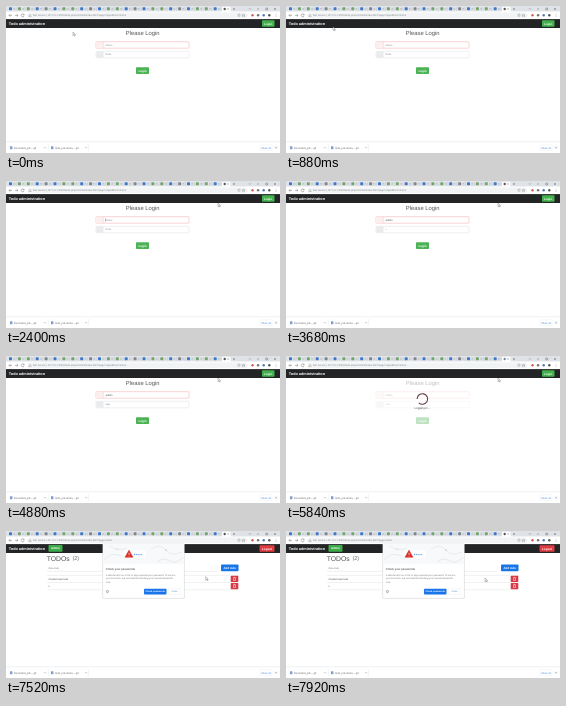
An HTML page that plays this animation: 274x147 px, repeating every 8000 ms.

```html
<!DOCTYPE html>
<html lang="en">
<head>
<meta charset="utf-8">
<title>Todo login</title>
<style>
html, body { margin: 0; width: 100%; height: 100%; overflow: hidden; background: #fff; }
svg { display: block; width: 100vw; height: 100vh; }
text { font-family: "Liberation Sans", Arial, sans-serif; text-rendering: geometricPrecision; }
</style>
</head>
<body>
<svg id="stage" viewBox="0 0 274 147"></svg>
<script>
const LOOP = 8000;
const stage = document.getElementById("stage");

function el(name, attrs, parent = stage) {
  const node = document.createElementNS("http://www.w3.org/2000/svg", name);
  for (const key in attrs) node.setAttribute(key, attrs[key]);
  parent.appendChild(node);
  return node;
}
const group = (parent = stage) => el("g", {}, parent);
const rect = (p, x, y, width, height, fill, more = {}) =>
  el("rect", { x, y, width, height, fill, ...more }, p);
const path = (p, d, stroke, width = 0.5, fill = "none") =>
  el("path", { d, stroke, "stroke-width": width, fill }, p);
const dot = (p, cx, cy, r, fill) => el("circle", { cx, cy, r, fill }, p);
function label(p, x, y, size, fill, words, more = {}) {
  const node = el("text", { x, y, "font-size": size, fill, ...more }, p);
  node.textContent = words;
  return node;
}
const mid = { "text-anchor": "middle" };
function button(p, x, y, w, h, fill, words, size = 3) {
  rect(p, x, y, w, h, fill, { rx: 0.8 });
  label(p, x + w / 2, y + h / 2 + size * 0.35, size, "#fff", words, { ...mid, "font-weight": 700 });
}

const clamp = v => Math.max(0, Math.min(1, v));
const ramp = (t, a, b) => clamp((t - a) / (b - a));
const show = (node, on) => node.setAttribute("visibility", on ? "visible" : "hidden");

rect(stage, 0, 0, 274, 147, "#fff");

// login page
const login = group();
label(login, 136.7, 28.7, 5.85, "#555", "Please Login", mid);
function field(y, stroke) {
  rect(login, 90, y, 93, 6.5, "#fff", { rx: 0.7, stroke, "stroke-width": 0.5 });
  rect(login, 90.2, y + 0.2, 7, 6.1, stroke === "#f3a6a6" ? "#fbefef" : "#e9ebed");
  path(login, `M97.2 ${y}v6.5`, stroke, 0.3);
  return label(login, 99.5, y + 4.1, 2.6, "#888", "");
}
const user = field(35.7, "#f3a6a6");
const pass = field(45.3, "#dcdfe2");
const caret = rect(login, 99, 37.2, 0.3, 3.2, "#333");
button(login, 130, 61.2, 13, 6.8, "#4cb355", "Login");

// todo page
const todos = group();
const heading = label(todos, 40.8, 29.5, 6.8, "#555", "TODOs");
const count = label(todos, 66.5, 29.4, 5.4, "#666", "(2)");
label(todos, 42.5, 37.8, 2.5, "#777", "New todo");
path(todos, "M41 40.4H211", "#dcdfe2", 0.4);
button(todos, 215, 33.5, 17.5, 6.8, "#1976e8", "Add todo", 2.9);
const list = group(todos);
path(list, "M41 44.4H233M41 51.6H233M41 58.8H233", "#d9dcdf", 0.4);
["Created new todo", "x"].forEach((name, i) => {
  const y = 44.8 + i * 7.1;
  label(list, 42.5, y + 4.2, 2.5, "#444", name);
  rect(list, 224.7, y, 7.6, 6.3, "#d93a45", { rx: 0.8 });
  path(list, `M227 ${y + 2}h3M227.5 ${y + 2.4}v2.2h2v-2.2M228 ${y + 1.5}h1`, "#fff", 0.5);
});

// busy layer
const veil = rect(stage, 0, 22, 274, 113, "#fff");
const busy = group();
const ring = path(busy, "", "#653d48", 1.1);
const note = label(busy, 136.4, 0, 2.9, "#444", "", mid);

// browser frame
const chrome = group();
rect(chrome, 0, 0, 274, 5.7, "#dfe2e7");
const tints = ["#3b78c9", "#555", "#333", "#d34a45", "#7d858d", "#4f9bd5", "#222", "#d9665e", "#71a56b", "#4a5d78"];
for (let i = 0; i < 24; i++) {
  const x = 3 + i * 8.9;
  rect(chrome, x, 1.3, 3, 3, tints[(i * 7 + i * i) % tints.length], { rx: 0.8 });
  path(chrome, `M${x + 4.7} 2.3l1.1 1.2m0 -1.2l-1.1 1.2`, "#777", 0.35);
  path(chrome, `M${x + 7.3} 1.2v3.2`, "#aeb3b9", 0.3);
}
path(chrome, "M215 5.8q1 0 1-1.2V1.8q0-1 1-1h6.5q1 0 1 1v2.8q0 1.2 1 1.2z", "none", 0, "#fff");
const icon = dot(chrome, 218.7, 3, 1.2, "#555");
path(chrome, "M221.5 2.4l1.2 1.2m0-1.2l-1.2 1.2M227 3h2M228 2v2", "#555", 0.4);
path(chrome, "M243 2.4l1 1l1-1M251 3h2M259.8 2.1h1.8v1.8h-1.8zM268 2l2 2m0-2l-2 2", "#555", 0.4);
rect(chrome, 0, 5.7, 274, 7.4, "#fff");
rect(chrome, 21.5, 6.5, 220, 5.6, "#f1f3f4", { rx: 2.8 });
path(chrome, "M6 9.4H3m1.3-1.3L3 9.4l1.3 1.3M9 9.4h3m-1.3-1.3l1.3 1.3l-1.3 1.3", "#666", 0.45);
path(chrome, "M18 8.6a1.5 1.5 0 1 0 .1 1.3M18.2 7.9v1h-1", "#666", 0.45);
path(chrome, "M24 8.3l1.3 2.1h-2.6z", "#777", 0.35);
const url = label(chrome, 27, 10.3, 2.55, "#80868b", "");
path(chrome, "M232 8.2h2v2h-2zM237.5 8l.5 1h1l-.8.7l.3 1l-1-.6l-1 .6l.3-1l-.8-.7h1z", "#777", 0.35);
["#d65c52", "#777", "#4c79bd", "#555"].forEach((c, i) => dot(chrome, 246.5 + i * 5.6, 9.3, 1.2, c));
[8, 9.3, 10.6].forEach(y => dot(chrome, 270, y, 0.3, "#555"));

rect(chrome, 0, 13.1, 274, 8.9, "#222426");
label(chrome, 2.8, 18.7, 3.8, "#fff", "Todo administration", { "font-weight": 700 });
const guest = group();
button(guest, 256, 14.2, 12.5, 6.6, "#43b24d", "Login", 2.9);
const member = group();
button(member, 42.5, 14, 14, 6.8, "#3daa49", "Admin", 2.9);
button(member, 253.5, 14.2, 15, 6.6, "#e03d43", "Logout", 2.9);

// download bar
const bar = group();
path(bar, "M0 135.8H274M42.2 138v7M82.3 138v7", "#d9dce0", 0.4);
["Recorded_job-...gif", "todo_job-demo-...gif"].forEach((name, i) => {
  const x = 4 + i * 41;
  rect(bar, x, 140.3, 2.4, 3, "#7e9fd0", { rx: 0.3 });
  label(bar, x + 4, 142.8, 2.65, "#666", name);
  path(bar, `M${x + 34} 142.2l1-1l1 1`, "#777", 0.4);
});
rect(bar, 253.7, 138.8, 12.4, 5.7, "#fff", { rx: 0.8, stroke: "#dfe2e5", "stroke-width": 0.3 });
label(bar, 259.9, 142.5, 2.6, "#4285df", "Show all", mid);
path(bar, "M269.2 140.8l1.7 1.7m0-1.7l-1.7 1.7", "#666", 0.4);

// password notice
const notice = group();
rect(notice, 96.4, 12.4, 82.4, 55.4, "#000", { rx: 1.3, opacity: 0.12 });
rect(notice, 96.8, 12.3, 81.5, 54.9, "#fff", { rx: 1, stroke: "#d5d8dc", "stroke-width": 0.35 });
rect(notice, 97, 12.5, 81.1, 20.7, "#f8f9fa");
path(notice, "M98 29q8-9 17-4M104 15q9 6 16 2M145 18q9-6 15 1t16 2M151 31q7-5 13-1t13-4", "#d6dade", 0.5);
dot(notice, 111, 18, 0.6, "#b9c0c7");
dot(notice, 160, 19, 0.7, "#b9c0c7");
rect(notice, 118, 19, 22, 8.3, "#fff", { rx: 4.1 });
path(notice, "M123 19.2l3.9 7h-7.8z", "#d93025", 0.6, "#d93025");
path(notice, "M123 21.8v2M123 24.7v.7", "#fff", 0.7);
for (let i = 0; i < 5; i++) dot(notice, 128.5 + i * 1.8, 23.6, 0.55, "#4285f4");
label(notice, 99.8, 39.2, 2.9, "#333", "Check your passwords");
["A data breach on a site or app exposed your password. To secure",
 "your accounts, we recommend checking your saved passwords",
 "now."].forEach((s, i) => label(notice, 99.8, 44.8 + i * 3.6, 2.4, "#777", s));
el("circle", { cx: 101.4, cy: 60.5, r: 1.1, fill: "none", stroke: "#777", "stroke-width": 0.6 }, notice);
button(notice, 138, 57.7, 22.5, 5.8, "#1a73e8", "Check passwords", 2.35);
rect(notice, 162.5, 57.7, 12, 5.8, "#fff", { rx: 0.8, stroke: "#e1e4e8", "stroke-width": 0.3 });
label(notice, 168.5, 61.4, 2.35, "#4b83d1", "Close", mid);

const pointer = path(stage, "M0 0v3.6l.9-.8l.6 1.3l.6-.3l-.6-1.2h1.1z", "#333", 0.3, "#fff");

// time, x, y
const track = [[0, 67, 26], [160, 67, 26], [800, 47, 20.8], [1040, 47, 20.8], [1760, 212, 22],
  [7040, 212, 22], [7600, 199, 47], [8000, 199, 47]];
function pointerAt(t) {
  const i = Math.max(1, track.findIndex(k => k[0] >= t));
  const a = track[i - 1], b = track[i];
  const p = ramp(t, a[0], b[0]), e = p * p * (3 - 2 * p);
  return [a[1] + (b[1] - a[1]) * e, a[2] + (b[2] - a[2]) * e];
}

function drawRing(t, cy) {
  const phase = (t - 6800) / 1920 * Math.PI * 2;
  const length = Math.PI * 2 * (0.45 - 0.42 * Math.cos(phase));
  const at = a => `${136.4 + 5.3 * Math.cos(a)} ${cy + 5.3 * Math.sin(a)}`;
  ring.setAttribute("d", `M${at(phase)}A5.3 5.3 0 ${+(length > Math.PI)} 1 ${at(phase + length)}`);
}

function typed(node, words, hint, n, color) {
  node.textContent = n > 0 ? words.slice(0, n) : hint;
  node.setAttribute("fill", n > 0 ? color : "#888");
}

function render(t) {
  const inside = t >= 6320;
  const loaded = t >= 7120;
  show(login, !inside);
  show(guest, !inside);
  show(todos, inside);
  show(member, inside);
  show(list, loaded);
  show(count, loaded);
  url.textContent = "Not secure | 127.0.0.1:5500/todo-project/client/index.html?page=" + (inside ? "todos" : "login&from=home");

  const nUser = Math.floor((t - 2720) / 120) + 1;
  const nPass = Math.floor((t - 3680) / 100) + 1;
  typed(user, "admin", "Name", nUser, "#444");
  typed(pass, "•••••", "Pass", nPass, "#555");
  const second = t >= 3440;
  const n = Math.max(0, Math.min(5, second ? nPass : nUser));
  caret.setAttribute("x", 99.3 + n * (second ? 0.92 : 1.4));
  caret.setAttribute("y", second ? 46.9 : 37.3);
  show(caret, !inside && t >= 960 && t < 5040 && t % 1000 < 500);

  const fade = ramp(t, 5040, 5280) * (1 - ramp(t, 7040, 7200));
  veil.setAttribute("opacity", 0.64 * fade);
  busy.setAttribute("opacity", fade);
  drawRing(t, inside ? 33.7 : 43);
  note.textContent = inside ? "Processing..." : "Logging in...";
  note.setAttribute("y", inside ? 43.8 : 53.2);
  icon.setAttribute("fill", fade > 0 ? "#6d89b4" : "#555");

  show(notice, t >= 7280);
  pointer.setAttribute("transform", `translate(${pointerAt(t)})`);
}

const start = performance.now();
function tick() {
  render((performance.now() - start) % LOOP);
  requestAnimationFrame(tick);
}
render(0);
requestAnimationFrame(tick);
</script>
</body>
</html>
```
